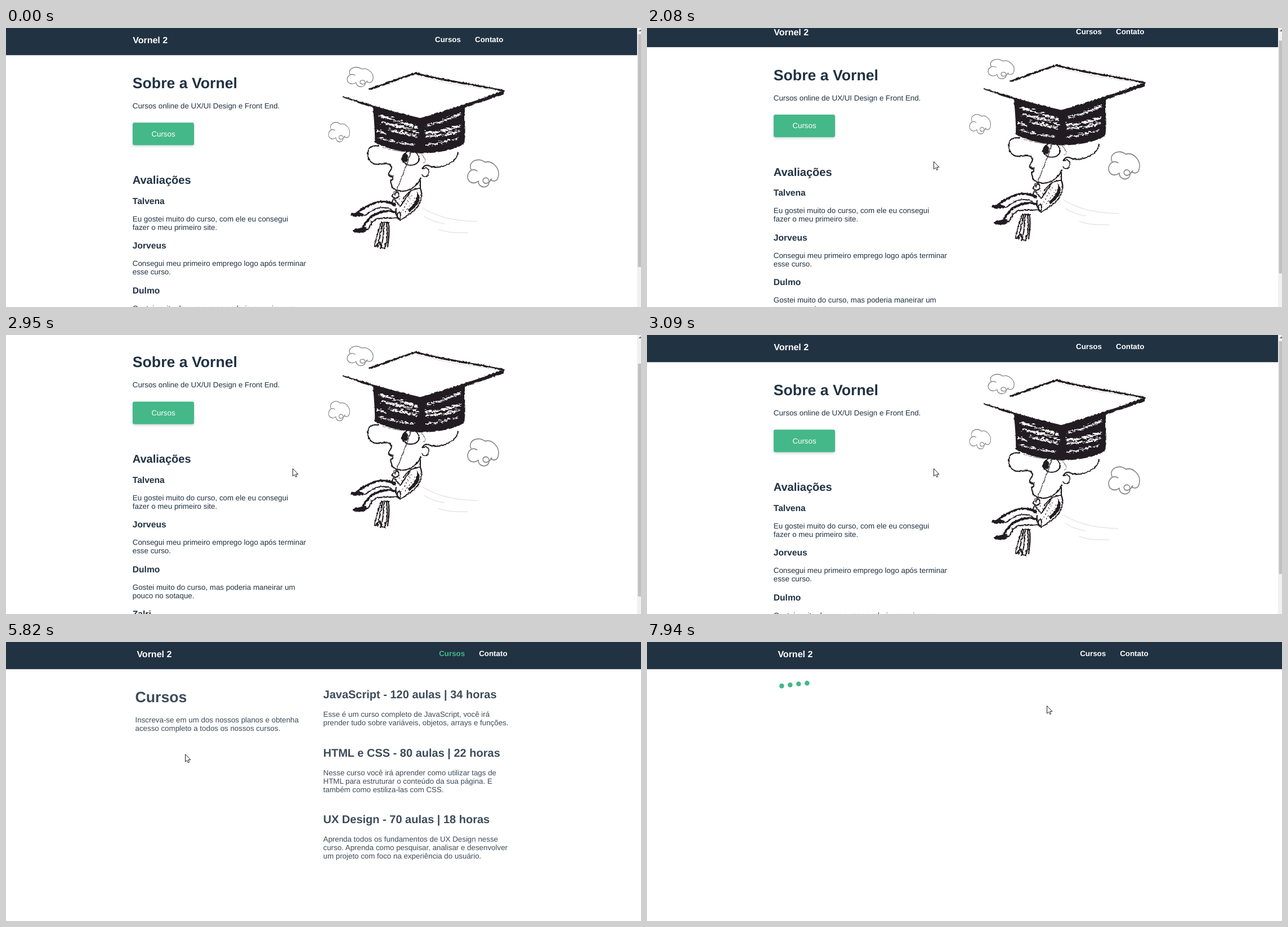
An HTML page that plays this animation: 1128 px wide and 496 px high, repeating every 8000 ms.

```html
<!DOCTYPE html>
<html lang="pt-BR">
<head>
<meta charset="utf-8">
<title>Cursos</title>
<style>
  html, body { margin: 0; width: 100%; height: 100%; overflow: hidden; background: #fff; }
  svg { display: block; width: 100vw; height: 100vh; }
  text { font: 13.333px Arial, "Liberation Sans", sans-serif; fill: #213243; text-rendering: geometricPrecision; }
  .h1 { font-size: 26.667px; font-weight: bold; }
  .h2 { font-size: 20px; font-weight: bold; }
  .h3 { font-size: 15.6px; font-weight: bold; }
  .brand { font-size: 16px; font-weight: bold; fill: #fff; }
  .nav { font-weight: bold; fill: #fff; }
  .green { fill: #44b888; }
  .white { fill: #fff; }
  .button { filter: drop-shadow(0 2px 2px rgba(30, 60, 90, .22)); }
  .ink, .cloud, .faint, .streak { fill: none; stroke-linecap: round; stroke-linejoin: round; }
  .ink { stroke: #231f20; stroke-width: 2.2; }
  .bold { stroke-width: 4; }
  .thin { stroke-width: 1.1; }
  .solid { fill: #231f20; }
  .paper { fill: #fff; }
  .faint { stroke: #d9d9d9; stroke-width: 1; }
  .streak { stroke: #fff; stroke-width: 3; }
  .cloud { stroke: #858585; stroke-width: 1.3; }
  .cloud path { vector-effect: non-scaling-stroke; }
</style>
</head>
<body>
<svg viewBox="0 0 1128 496" preserveAspectRatio="none">
  <defs>
    <filter id="rough" x="590" y="60" width="310" height="345" filterUnits="userSpaceOnUse">
      <feTurbulence baseFrequency=".16" numOctaves="2" seed="4"/>
      <feDisplacementMap in="SourceGraphic" scale="3" xChannelSelector="R" yChannelSelector="G"/>
    </filter>
    <filter id="brush" x="645" y="130" width="175" height="90" filterUnits="userSpaceOnUse">
      <feTurbulence baseFrequency=".12 .3" numOctaves="2" seed="9"/>
      <feDisplacementMap in="SourceGraphic" scale="9" xChannelSelector="R" yChannelSelector="G"/>
    </filter>
    <path id="cloud" d="M5 13C0 3 16-3 26 4C36 1 48 11 46 21C45 29 38 29 34 26M14 15C7 11 0 16 0 23C1 31 10 32 16 28C16 38 33 38 32 28C31 22 22 23 23 28C25 33 32 31 36 25"/>
  </defs>

  <g id="home">
    <g id="homeText"></g>
    <rect class="button green" x="225" y="168.3" width="109" height="40" rx="3"/>
    <text class="white" x="258.4" y="192.5">Cursos</text>

    <g class="cloud">
      <use href="#cloud" transform="translate(606 69)"/>
      <use href="#cloud" transform="translate(573 167) scale(.81 1)"/>
      <use href="#cloud" transform="translate(820 233) scale(1.19 1.4)"/>
    </g>
    <g class="faint">
      <path d="M708 133C728 127 748 126 776 129M724 125C738 121 752 121 765 123M797 104C805 113 815 117 826 118"/>
      <path d="M740 320C770 338 800 343 837 344M743 335C754 342 766 346 779 348M768 358C788 365 802 364 820 364"/>
    </g>

    <g filter="url(#rough)">
      <!-- cap -->
      <path class="solid" d="M651 139L735 167L815 131C812 155 817 180 813 205C795 216 765 222 735 222C704 220 670 212 654 202C655 180 652 160 651 139Z"/>
      <path class="paper" d="M598 121L645 108L728 80L884 113L735 162Z"/>
      <path class="ink" style="stroke-width:3.4" d="M645 108C675 99 705 85 728 80C775 93 835 100 883 111"/>
      <path class="solid" d="M597 120C640 134 690 149 735 159C785 146 835 127 880 112L885 112L884 117C840 132 790 149 736 168C690 153 645 140 597 122Z"/>
      <path class="faint" d="M728 84C775 97 825 104 868 110"/>
      <!-- head -->
      <path class="ink" d="M661 209C648 206 641 214 642 225C643 239 654 243 666 241C676 239 684 241 684 247C683 254 677 256 679 261C683 265 688 264 686 268C679 272 684 274 684 279C687 289 700 291 711 288C724 286 731 276 736 266M681 261L688 263"/>
      <ellipse class="ink" cx="718" cy="231" rx="15" ry="12"/>
      <ellipse class="solid" cx="708" cy="230" rx="5.5" ry="8"/>
      <path class="ink thin" stroke-opacity=".6" d="M668 211C686 217 702 219 716 219M737 223C745 232 746 236 741 240"/>
      <path class="ink" d="M757 247C777 247 799 240 802 221M757 247C749 242 742 241 739 249M739 250C746 245 753 251 750 258C748 265 740 266 739 260M735 267L735 284"/>
      <path class="ink" stroke-opacity=".75" stroke-width="1.8" style="stroke-width:1.8" d="M723 196C720 229 699 268 690 297"/>
      <!-- body -->
      <path class="ink" d="M735 284C720 285 711 294 705 302M735 284C741 299 735 313 724 324C716 331 707 336 699 341M716 293C708 304 704 309 700 316C695 315 694 308 690 304M700 341C694 336 690 329 692 320"/>
      <path class="solid" d="M729 289C738 301 735 313 715 327L713 322C724 313 731 304 729 289Z"/>
      <path class="ink thin" stroke-dasharray="1 5" d="M720 297L704 323M726 301L708 327M698 303L702 309M715 300L701 330"/>
      <path class="ink" d="M688 291C698 288 700 299 692 302C682 301 685 293 691 294M688 302C684 308 683 314 690 316"/>
      <!-- legs -->
      <path class="ink bold" d="M690 313C674 306 658 307 648 313C638 318 631 321 625 326"/>
      <path class="ink" d="M684 322C667 314 655 319 636 333M625 326L636 333M695 336C681 339 667 335 657 339C650 344 646 351 642 357"/>
      <path class="ink bold" d="M691 327C678 321 661 327 650 333C642 341 638 346 634 352"/>
      <path class="ink" d="M634 352L642 358M648 343L648 350"/>
      <path class="solid" d="M626 326C620 329 613 327 611 331C613 336 625 335 636 333ZM634 352C629 356 617 355 615 360C620 366 635 365 642 358Z"/>
      <ellipse class="ink" cx="697" cy="333" rx="3" ry="6"/>
      <!-- tassel -->
      <path class="ink" d="M666 345C661 359 656 373 654 387M668 347C666 364 660 376 660 389M671 347C670 365 668 380 665 391M675 347C679 365 676 379 672 391M678 345C682 361 678 377 677 388M666 345L680 345M654 387C659 390 660 380 664 380C664 391 671 393 673 389"/>
    </g>

    <g class="streak" filter="url(#brush)">
      <path d="M661 153L727 174M665 166C690 171 710 175 730 184M657 181L673 185M680 179L726 190"/>
      <path d="M661 193C680 199 705 204 722 204M695 164L727 176" style="stroke-width:2"/>
      <path d="M746 170C765 167 785 159 803 151M742 184C765 184 785 178 804 171M744 191C770 188 788 187 802 181"/>
      <path d="M744 205C764 204 784 199 799 193" style="stroke-width:2"/>
    </g>
    <path class="ink" style="stroke-width:1.5" d="M728 169C720 184 718 186 723 196C700 201 681 190 674 186C684 178 704 179 728 181"/>
  </g>

  <g id="courses"></g>
  <g id="dots" class="green"></g>

  <g id="header">
    <rect id="bar" y="-2" height="50.3" fill="#213243"/>
    <g id="menu">
      <text class="brand" x="225.2" y="27.3">Vornel 2</text>
      <text id="coursesLink" class="nav" x="762" y="25">Cursos</text>
      <text class="nav" x="833" y="25">Contato</text>
    </g>
  </g>

  <g id="scrollbar">
    <rect x="1121" width="7" height="496" fill="#f1f1f1"/>
    <path d="M1123.5 6L1127 2.5L1130 6Z" fill="#777"/>
    <rect id="thumb" x="1122.5" y="11" width="6" height="414" fill="#c1c1c1"/>
  </g>
  <path id="cursor" d="M.5.5V14L3.6 11.2L5.6 15.6L7.7 14.7L5.8 10.4H9.8Z" fill="#fff" stroke="#222"/>
</svg>

<script>
  const LOOP = 8000, FIRST_CLICK = 4500, COURSES_IN = 5695, SECOND_CLICK = 7390;
  const $ = id => document.getElementById(id);
  const clamp = u => Math.min(1, Math.max(0, u));
  const progress = (t, from, to) => clamp((t - from) / (to - from));
  const smooth = u => u * u * (3 - 2 * u);
  const move = (el, x, y) => el.setAttribute('transform', `translate(${x} ${y})`);
  const show = (el, on) => el.setAttribute('display', on ? 'inline' : 'none');

  const text = (x, y, content, style = '') => `<text class="${style}" x="${x}" y="${y}">${content}</text>`;
  const paragraph = (x, y, lines) => lines.map((line, i) => text(x, y + i * 15, line)).join('');

  const reviews = [
    ['Talvena', 'Eu gostei muito do curso, com ele eu consegui', 'fazer o meu primeiro site.'],
    ['Jorveus', 'Consegui meu primeiro emprego logo após terminar', 'esse curso.'],
    ['Dulmo', 'Gostei muito do curso, mas poderia maneirar um', 'pouco no sotaque.'],
    ['Zalri', 'Curso muito bom, quando vai sair o de Oru.js?'],
  ];
  const left = 224.8;
  $('homeText').innerHTML =
    text(left, 107, 'Sobre a Vornel', 'h1') +
    text(left, 143.3, 'Cursos online de UX/UI Design e Front End.') +
    text(left, 277, 'Avaliações', 'h2') +
    reviews.map(([name, ...lines], i) => {
      const y = 312.5 + i * 79.6;
      return text(left, y, name, 'h3') + paragraph(left, y + 31, lines);
    }).join('');

  const courseList = [
    [100, 'JavaScript - 120 aulas | 34 horas',
      'Esse é um curso completo de JavaScript, você irá',
      'prender tudo sobre variáveis, objetos, arrays e funções.'],
    [203.5, 'HTML e CSS - 80 aulas | 22 horas',
      'Nesse curso você irá aprender como utilizar tags de',
      'HTML para estruturar o conteúdo da sua página. E',
      'também como estiliza-las com CSS.'],
    [322, 'UX Design - 70 aulas | 18 horas',
      'Aprenda todos os fundamentos de UX Design nesse',
      'curso. Aprenda como pesquisar, analisar e desenvolver',
      'um projeto com foco na experiência do usuário.'],
  ];
  $('courses').innerHTML =
    text(232, 107, 'Cursos', 'h1') +
    paragraph(232, 143.3, ['Inscreva-se em um dos nossos planos e obtenha', 'acesso completo a todos os nossos cursos.']) +
    courseList.map(([y, title, ...lines]) =>
      text(566, y, title, 'h2') + paragraph(566, y + 33.3, lines)).join('');

  $('dots').innerHTML = [239.3, 254.3, 269.3, 284.3].map(x => `<circle cx="${x}" r="4.3"/>`).join('');
  const dots = [...$('dots').children];

  // time, x, y of the pointer tip
  const pointerPath = [
    [130, 1050, 449], [270, 892, 283], [460, 892, 283], [950, 512, 238], [1150, 511, 237],
    [1480, 510, 237], [1810, 509, 237], [3540, 509, 237], [4230, 267, 178], [4370, 272, 188],
    [5660, 272, 188], [5900, 334, 203], [6100, 339, 202], [6930, 703, 108], [7130, 707, 108],
    [7320, 707, 108], [7390, 710, 113], [LOOP, 710, 113],
  ];

  function pointerAt(t) {
    const i = Math.max(1, pointerPath.findIndex(key => key[0] > t));
    const [t0, x0, y0] = pointerPath[i - 1], [t1, x1, y1] = pointerPath[i];
    const u = smooth(progress(t, t0, t1));
    return [x0 + (x1 - x0) * u, y0 + (y1 - y0) * u];
  }

  function draw(t) {
    const atHome = t < FIRST_CLICK;
    const onCourses = t >= COURSES_IN && t < SECOND_CLICK;
    const loading = !atHome && !onCourses;

    const scroll = 98 * (smooth(progress(t, 2015, 2290)) - smooth(progress(t, 2815, 3090)));
    show($('home'), atHome);
    show($('scrollbar'), atHome);
    move($('home'), 0, -scroll);
    move($('header'), 0, -scroll);
    move($('thumb'), 0, scroll * .8);
    move($('menu'), atHome ? 0 : 7.2, 0);
    $('bar').setAttribute('width', atHome ? 1121 : 1128);
    $('coursesLink').style.fill = !atHome && t < SECOND_CLICK ? '#44b888' : '#fff';

    const enter = 1 - (1 - progress(t, COURSES_IN, COURSES_IN + 200)) ** 2.1;
    show($('courses'), onCourses);
    $('courses').setAttribute('opacity', enter);
    move($('courses'), -20 * (1 - enter), 0);

    show($('dots'), loading);
    const waited = t - (t < SECOND_CLICK ? FIRST_CLICK : SECOND_CLICK);
    dots.forEach((dot, i) => {
      const phase = Math.max(0, waited - i * 120) / 1000;
      dot.setAttribute('cy', 72.3 + 5 * (1 - Math.cos(Math.PI * phase)));
    });

    show($('cursor'), t >= 130);
    move($('cursor'), ...pointerAt(t).map(Math.round));
  }

  function tick() {
    draw(performance.now() % LOOP);
    requestAnimationFrame(tick);
  }
  tick();
</script>
</body>
</html>
```
